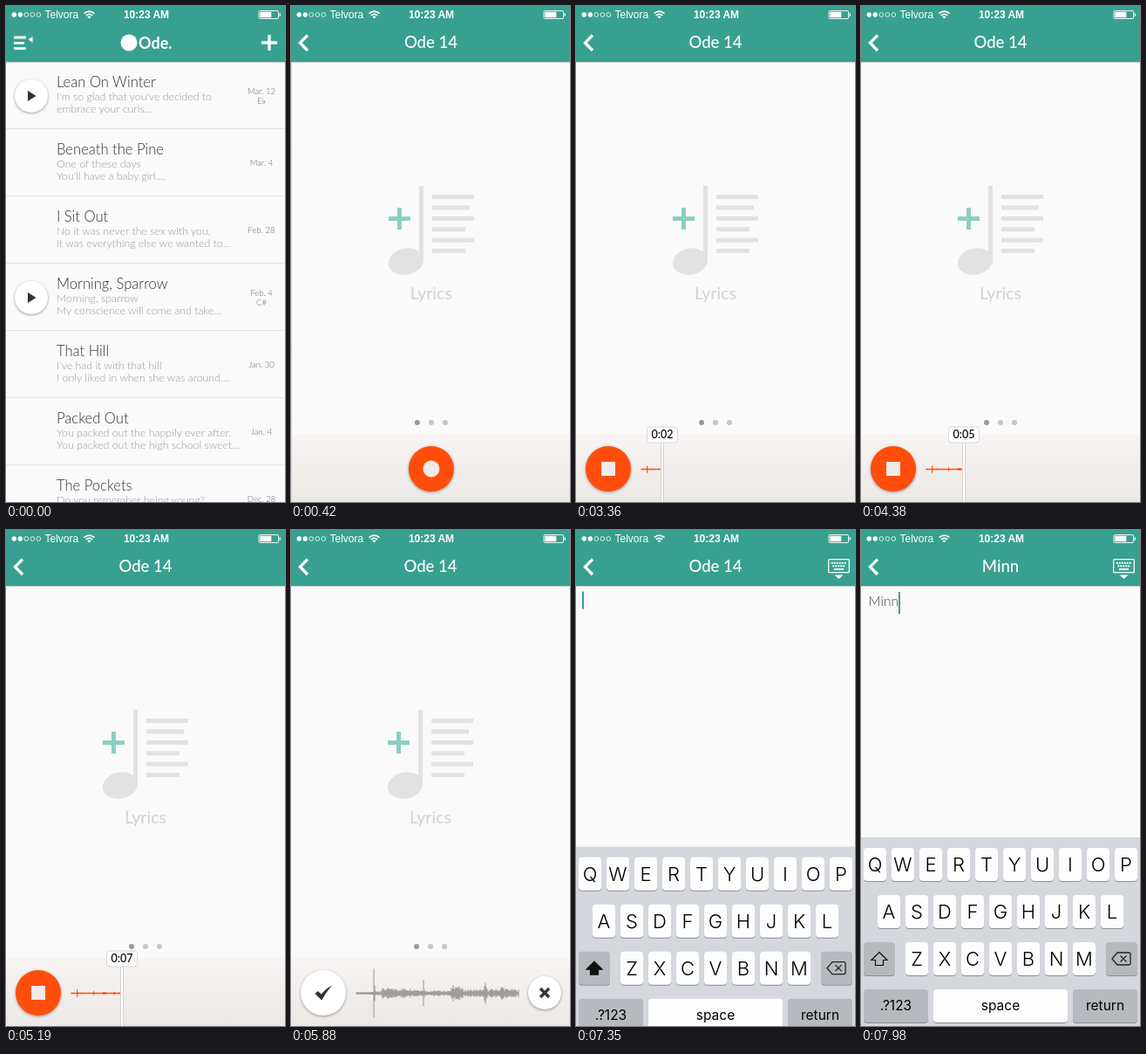
Write an HTML page that moves like this. It is 320 px wide and 568 px high and loops after 8000 ms.

```html
<!DOCTYPE html>
<html lang="en">
<head>
<meta charset="utf-8">
<title>Song notebook</title>
<style>
  html, body { margin: 0; width: 100%; height: 100%; overflow: hidden; background: #fafafa; }
  svg { display: block; width: 100vw; height: 100vh; font-family: Lato, "Open Sans", sans-serif; }
  .mid { text-anchor: middle; }
  .song { font-size: 16.6px; font-weight: 300; fill: #333; }
  .line { font-size: 12.35px; font-weight: 300; fill: #999; }
  .date { font-size: 9.5px; font-weight: 300; fill: #666; text-anchor: middle; }
  .title { font-size: 18.5px; font-weight: 500; fill: #fff; text-anchor: middle; }
  .status { font: 12px "Liberation Sans", Arial, sans-serif; fill: #fff; }
  .key { font: 300 22px Inter, Roboto, sans-serif; fill: #000; text-anchor: middle; }
  .wide { font-size: 15.5px; font-weight: 400; }
  .raised { filter: drop-shadow(0 1.5px 1.5px rgba(0, 0, 0, .38)); }
</style>
</head>
<body>
<svg id="stage" viewBox="0 0 320 568" xmlns="http://www.w3.org/2000/svg"></svg>
<script>
const LOOP = 8000, TEAL = '#38a090', ORANGE = '#ff4e0b';

const songs = [
  ['Lean On Winter', "I'm so glad that you've decided to", 'embrace your curls...', ['Mar. 12', 'E♭'], true],
  ['Beneath the Pine', 'One of these days', "You'll have a baby girl....", ['Mar. 4']],
  ['I Sit Out', 'No it was never the sex with you,', 'It was everything else we wanted to...', ['Feb. 28']],
  ['Morning, Sparrow', 'Morning, sparrow', 'My conscience will come and take...', ['Feb. 4', 'C#'], true],
  ['That Hill', "I've had it with that hill", 'I only liked in when she was around....', ['Jan. 30']],
  ['Packed Out', 'You packed out the happily ever after.', 'You packed out the high school sweet...', ['Jan. 4']],
  ['The Pockets', 'Do you remember being young?', '', ['Dec. 28']]
];

const text = (x, y, cls, s) => `<text x="${x}" y="${y}" class="${cls}">${s}</text>`;
const rect = (x, y, w, h, fill, more = '') =>
  `<rect x="${x}" y="${y}" width="${w}" height="${h}" fill="${fill}" ${more}/>`;
const circle = (x, y, r, fill, more = '') =>
  `<circle cx="${x}" cy="${y}" r="${r}" fill="${fill}" ${more}/>`;
const path = (d, more) => `<path d="${d}" ${more}/>`;
const line = (color, width) => `fill="none" stroke="${color}" stroke-width="${width}"`;
const group = (id, body, more = '') => `<g id="${id}" ${more}>${body}</g>`;

function songRow([name, first, second, dates, playable], i) {
  const y = 64 + 77 * i;
  const button = playable
    ? circle(29, y + 39, 19, '#fff', 'class="raised"') + path(`M25 ${y + 33}v12l9.5-6z`, 'fill="#333"') : '';
  const dateTop = y + (dates.length > 1 ? 37 : 42);
  return rect(0, y + 76, 320, 1, '#e3e3e3') + button +
    text(58, y + 29, 'song', name) + text(58, y + 44, 'line', first) + text(58, y + 58, 'line', second) +
    dates.map((d, k) => text(293, dateTop + 11 * k, 'date', d)).join('');
}

function lyricsArt() {
  const bars = [48, 43, 48, 38, 48, 38]
    .map((w, i) => rect(161, 216 + 12.4 * i, w, 5, '#e2e2e2')).join('');
  return rect(146, 206, 5, 86, '#e2e2e2') +
    '<ellipse cx="131" cy="292.5" rx="20.3" ry="15" fill="#e2e2e2" transform="rotate(-12 131 292.5)"/>' +
    bars + rect(111, 241, 25, 5, '#8bcfc0') + rect(121, 231, 5, 25, '#8bcfc0') +
    text(160, 336, 'mid', '<tspan font-size="19.6" fill="#d2d2d2">Lyrics</tspan>');
}

function key(x, y, w, label, fill = '#fdfdfd', cls = 'key') {
  return rect(x, y + 1, w, 38, '#8c8f94', 'rx="4"') + rect(x, y, w, 38, fill, 'rx="4"') +
    text(x + w / 2, y + (cls === 'key' ? 27 : 24), cls, label);
}

function keyboard() {
  const grey = '#b6b9be';
  const letters = [['QWERTYUIOP', 3], ['ASDFGHJKL', 19], ['ZXCVBNM', 51]]
    .map(([row, x], r) => [...row].map((c, i) => key(x + 32 * i, 364 + 54 * r, 26, c)).join('')).join('');
  return rect(0, 352, 320, 216, '#d4d7dc') + letters +
    key(3, 472, 36, '', grey) + key(281, 472, 36, '', grey) +
    path('M21 483.5l9 9h-4.5v6h-9v-6h-4.5z', 'id="shift" stroke="#111" stroke-width="1.2"') +
    path('M288 491l6-7h13q2 0 2 2v10q0 2-2 2h-13zM297.5 487.5l7 7m0-7l-7 7', line('#222', 1.3)) +
    key(3, 526, 74, '.?123', grey, 'key wide') + key(83, 526, 154, 'space', '#fdfdfd', 'key wide') +
    key(243, 526, 74, 'return', grey, 'key wide');
}

function statusBar() {
  const signal = [0, 1, 2, 3, 4].map(i =>
    circle(9.3 + 7 * i, 10, 2.4, i < 2 ? '#fff' : 'none', 'stroke="#fff" stroke-width=".8"')).join('');
  return signal + text(44.5, 14, 'status', 'Telvora') +
    path('M89.5 8.7q6-5 12 0M91.7 11q3.8-3.2 7.6 0', line('#fff', 1.6)) +
    path('M93.3 12.2q2.2-1.6 4.4 0l-2.2 2.4z', 'fill="#fff"') +
    text(161, 14, 'status mid', '<tspan font-weight="bold">10:23 AM</tspan>') +
    rect(290, 5.5, 22.5, 9, 'none', 'rx="1.5" stroke="#fff" stroke-width=".9"') +
    rect(291.3, 6.8, 13, 6.4, '#fff') + rect(313.5, 8.3, 1.3, 3.5, '#fff');
}

function keyboardIcon() {
  const dots = [0, 1, 2, 3, 4, 5].map(i => rect(292.8 + 3 * i, 36.8, 2, 2, '#fff')).join('') +
    [0, 1, 2, 3, 4].map(i => rect(294.3 + 3 * i, 40.3, 2, 2, '#fff')).join('');
  return rect(289.7, 33.7, 23.6, 15, 'none', 'rx="1" stroke="#fff" stroke-width="1.3"') + dots +
    rect(296, 44, 11, 2, '#fff') + path('M296.5 51.5h10l-5 4.5z', 'fill="#fff"');
}

function recorder() {
  const count = ['3', '2', '1'].map((d, i) =>
    `<text class="beat mid" x="${106.5 + 60.3 * i}" y="538.5" font-size="17">${d}</text>`).join('') +
    path('M289 524h1.5q.5 3 3 5 3.5 3.5 1.5 7.5.5-4.5-4.5-6v8q0 3.5-3 3.5-2.5 0-2.5-2 0-2.5 4-3z', 'class="beat"');
  const head = rect(-2, 500, 4, 68, '#d5d2d0') + rect(-1, 500, 2, 68, '#fff') +
    rect(-17.5, 482, 35, 18, '#fff', 'rx="3.5" stroke="#d8d6d5"') +
    '<text id="clock" class="mid" y="495" font-size="12.5" font-weight="500" fill="#000"></text>';
  const button = circle(0, 0, 26, ORANGE, 'id="face" class="raised"') +
    '<rect id="icon" fill="#f1ebe8"/>' +
    path('M-9.5 1l3.2-3 4.3 3.5Q2.5-4.5 10-8.5 3.5-1-1.8 8.5z', 'id="check" fill="#333"') +
    path('M-6-9v18l15-9z', 'id="play" fill="#333"');
  return rect(0, 490, 320, 78, 'url(#bar)') + group('count', count) +
    '<path id="wave" fill="none"/>' + group('head', head) + group('button', button) +
    group('cancel', circle(0, 0, 19, '#fff', 'class="raised"') + path('M-5-5L5 5M5-5L-5 5', line('#333', 3.2)));
}

document.getElementById('stage').innerHTML =
  '<defs><linearGradient id="bar" x2="0" y2="1"><stop stop-color="#f7f4f3"/><stop offset="1" stop-color="#ebe8e5"/></linearGradient></defs>' +
  group('list', rect(0, 64, 320, 504, '#fafafa') + songs.map(songRow).join('')) +
  rect(0, 64, 320, 504, '#000', 'id="dim"') +
  group('detail', rect(-1, 64, 1, 504, '#ccc') + rect(0, 64, 320, 504, '#fafafa') + group('art', lyricsArt()) +
    [144, 160, 176].map((x, i) => circle(x, 477, 3, i ? '#c6c6c6' : '#999')).join('') + recorder() +
    '<text id="typed" x="8.5" y="87" font-size="15.5" font-weight="300" fill="#444"></text>' +
    rect(7, 70.5, 2, 20, TEAL, 'id="cursor"')) +
  group('keys', keyboard()) +
  rect(0, 0, 320, 64, TEAL) + rect(0, 64, 320, 1, '#cfd3d2') + statusBar() +
  group('homeIcons',
    path('M9 36h14M9 42.3h12M9 48.7h14', line('#fff', 2.8)) + path('M30.5 35v7l-5-3.5z', 'fill="#fff"') +
    path('M293 42h18M302 33v18', line('#fff', 3.3))) +
  group('brand', circle(141, 42, 9.5, '#fff') +
    '<text x="152" y="49" font-size="18" font-weight="700" fill="#fff">Ode.</text>') +
  path('M19 33.5l-8.5 8.7L19 51', 'id="back" ' + line('#fff', 3.3)) +
  '<text id="title" class="title" x="160" y="48"></text>' +
  group('hide', keyboardIcon());

const el = Object.fromEntries([...document.querySelectorAll('[id]')].map(n => [n.id, n]));
const beats = [...document.querySelectorAll('.beat')];

const ramp = (t, a, b) => Math.min(1, Math.max(0, (t - a) / (b - a)));
const smooth = (t, a, b) => { const p = ramp(t, a, b); return p * p * (3 - 2 * p); };
const mix = (a, b, p) => a + (b - a) * p;
const fromOrange = (grey, p) => `rgb(${[255, 78, 11].map(c => Math.round(mix(c, grey, p)))})`;
const spring = (t, start) => { const k = Math.max(0, t - start) / 50; return 1 - (1 + k) * Math.exp(-k); };
const set = (node, attrs) => { for (const a in attrs) node.setAttribute(a, attrs[a]); };
const move = (node, x, y = 0, scale = 1) => node.setAttribute('transform', `translate(${x} ${y}) scale(${scale})`);
const fade = (node, v) => node.setAttribute('opacity', v);

// Loudness outline: position in the take, half height
const outline = [[0, 1.2], [19, 1.4], [20, 28], [21.5, 2.5], [27, 3], [31, 6], [45, 5], [60, 5.5], [76, 4],
  [77, 15], [78.5, 3], [108, 3], [111, 11], [118, 7], [124, 4], [146, 4], [148, 12], [150, 4.5],
  [164, 4.5], [167, 8], [171, 5], [187, 4]];
const noise = i => { const s = Math.sin(i * 12.9898) * 43758.5453; return s - Math.floor(s); };
function loudness(i) {
  const k = Math.max(1, outline.findIndex(p => p[0] >= i));
  const [a, b] = [outline[k - 1], outline[k]];
  const base = mix(a[1], b[1], (i - a[0]) / (b[0] - a[0]));
  return base > 11 || base < 2 ? base : base * (.45 + .65 * noise(i));
}

function drawWave(headX, p) {
  const step = mix(1 / 3, 1, p), gain = mix(.15, 1, p);
  let d = '';
  for (let i = 0; i < 187 && i / 3 <= headX - 75; i++) {
    const h = Math.max(.8, loudness(i) * gain);
    d += `M${(75 + i * step).toFixed(2)} ${(530.5 - h).toFixed(2)}v${(2 * h).toFixed(2)}`;
  }
  set(el.wave, { d, stroke: fromOrange(158, p), 'stroke-width': 1.1 });
}

function drawNavigation(t) {
  const p = spring(t, 15);
  move(el.list, -96 * p);
  fade(el.dim, .1 * p);
  move(el.detail, 321 * (1 - p));
  fade(el.homeIcons, 1 - ramp(p, 0, .7));
  move(el.brand, -110 * p);
  fade(el.brand, 1 - ramp(p, 0, .8));
  fade(el.back, ramp(p, .3, 1));
  move(el.title, 150 * (1 - p));
  fade(el.title, ramp(p, .2, 1));
}

function drawRecorder(t) {
  const slide = smooth(t, 440, 660), square = ramp(t, 2190, 2300), done = smooth(t, 5460, 5880);
  const saved = smooth(t, 6900, 7080);
  const size = mix(19, 16, slide);
  move(el.button, mix(160, 37, slide), 530);
  set(el.icon, { x: -size / 2, y: -size / 2, width: size, height: size, rx: size / 2 * (1 - square) });
  fade(el.icon, 1 - ramp(done, 0, .6));
  const pressed = t >= 6745 && t < 6900;
  el.face.setAttribute('fill', fromOrange(pressed ? 228 : 255, done));
  fade(el.check, ramp(done, .4, 1) * (1 - saved));
  fade(el.play, saved);
  move(el.cancel, 291, 530, done * (1 - saved));

  fade(el.count, ramp(t, 540, 660) * (1 - ramp(t, 2190, 2280)));
  const lit = [1080, 1410, 1740, 2040];
  beats.forEach((b, i) => b.setAttribute('fill', t >= lit[i] - 5 ? ORANGE : '#cbc8c6'));

  const x = Math.round(80 + (Math.min(t, 5450) - 2340) * .01852);
  const rolling = t >= 2185;
  move(el.head, x);
  fade(el.head, ramp(t, 2180, 2270) * (1 - ramp(t, 5460, 5600)));
  el.clock.textContent = '0:0' + Math.max(0, Math.floor((Math.min(t, 5450) - 2190) / 408));
  drawWave(rolling ? x : 0, done);
}

function drawEditor(t) {
  const count = [7825, 7885, 7940, 7970].filter(at => t >= at).length;
  const word = 'Minn'.slice(0, count);
  fade(el.art, 1 - ramp(t, 7080, 7280));
  fade(el.hide, ramp(t, 7080, 7280));
  move(el.keys, 0, 216 * (1 - spring(t, 7113)));
  el.typed.textContent = word;
  el.title.textContent = word || 'Ode 14';
  set(el.cursor, {
    opacity: t >= 7110 ? 1 : 0,
    x: count ? 8.5 + el.typed.getComputedTextLength() : 7,
    y: count ? 71 : 70.5,
    height: count ? 25 : 20
  });
  el.shift.setAttribute('fill', count ? 'none' : '#111');
}

const start = performance.now();
function frame() {
  const t = (performance.now() - start) % LOOP;
  drawNavigation(t);
  drawRecorder(t);
  drawEditor(t);
  requestAnimationFrame(frame);
}
frame();
</script>
</body>
</html>
```
